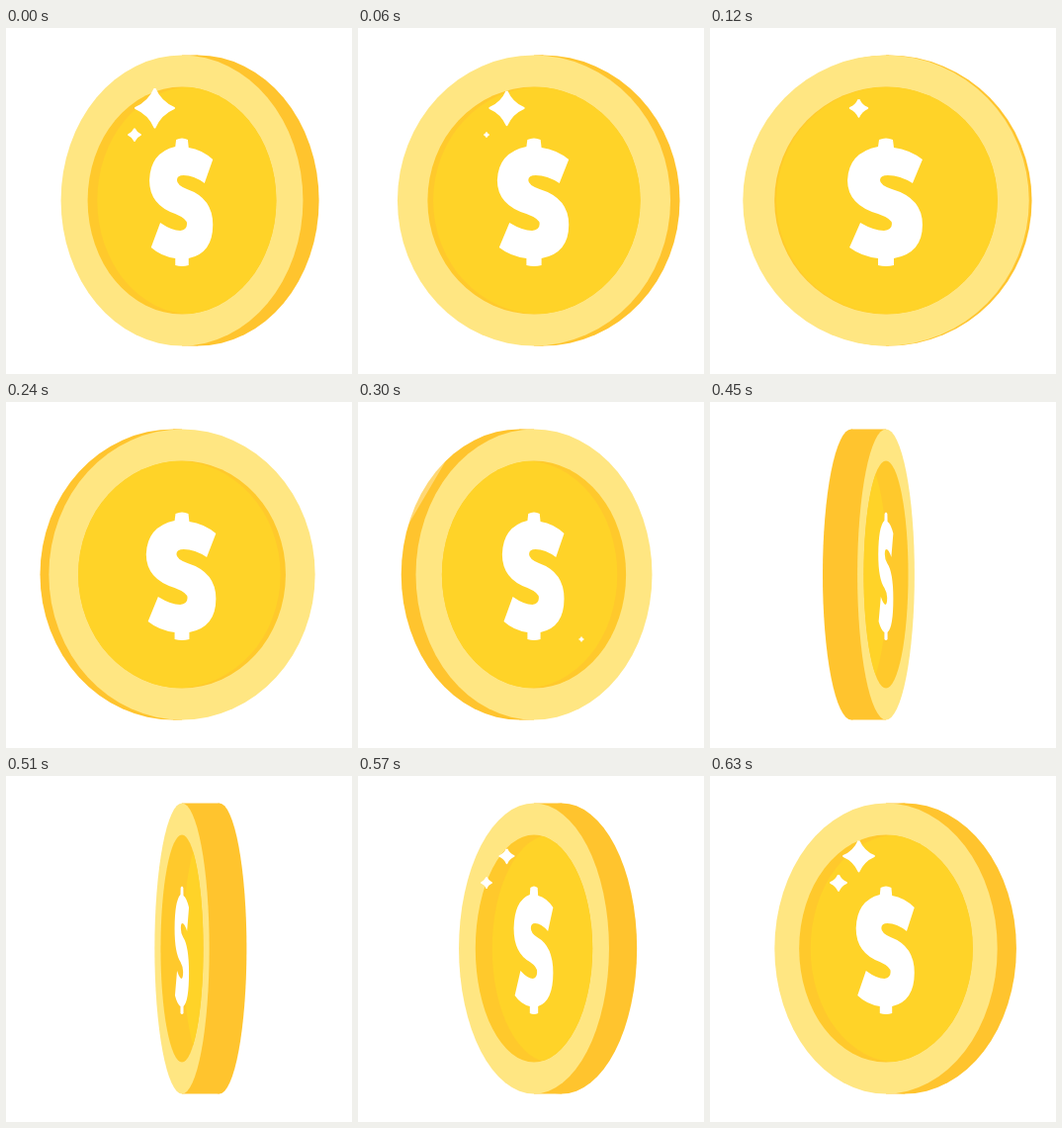
An HTML page with a canvas that plays this animation: 350 by 350 pixels, repeating every 660 ms.

```html
<!DOCTYPE html>
<html lang="en">
<head>
<meta charset="utf-8">
<title>Spinning coin</title>
<style>
  html, body { margin: 0; width: 100%; height: 100%; overflow: hidden; background: #fff; }
  canvas { display: block; width: 350px; height: 350px; }
</style>
</head>
<body>
<canvas id="stage" width="350" height="350"></canvas>
<script>
const ctx = document.getElementById('stage').getContext('2d');
const LOOP = 660, STEP = 30;
const CX = 178, CY = 174.5, RY = 147, RX = 145;
const RIM = '#ffe682', FACE = '#ffd328', SHADE = '#ffc92c', EDGE = '#ffc42e';

const dollar = new Path2D(
  'M-7 113Q0 110 7 113L8 121Q24 123 37 133L27 157Q14 149 2 149Q-6 149-6 154' +
  'Q-6 159 6 163Q37 172 37 199Q37 228 8 233L8 240Q0 242-8 240L-8 233' +
  'Q-25 231-37 222L-26 197Q-12 205-2 205Q6 204 6 198Q6 193-8 188' +
  'Q-39 179-39 154Q-38 126-8 120Z');

// Turn of the coin in degrees at given times; it gains half a turn per loop.
const turn = [[0, 32.4], [120, 3.5], [240, -21.8], [300, -34.5], [390, -57], [510, -101], [630, -141]];
const knot = i => {
  const n = turn.length, lap = Math.floor(i / n), [t, a] = turn[i - lap * n];
  return [t + lap * LOOP, a - lap * 180];
};
const slope = i => {
  const [t0, a0] = knot(i - 1), [t1, a1] = knot(i + 1);
  return (a1 - a0) / (t1 - t0);
};

function angleAt(t) {
  let i = turn.length - 1;
  while (turn[i][0] > t) i--;
  const [t0, a0] = knot(i), [t1, a1] = knot(i + 1);
  const d = t1 - t0, u = (t - t0) / d, v = 1 - u;
  const a = v * v * (1 + 2 * u) * a0 + u * u * (1 + 2 * v) * a1
          + d * u * v * (v * slope(i) - u * slope(i + 1));
  return (a < -90 ? a + 180 : a) * Math.PI / 180;
}

function oval(x, rx, ry, color) {
  ctx.fillStyle = color;
  ctx.beginPath();
  ctx.ellipse(x, CY, rx, ry, 0, 0, 7);
  ctx.fill();
}

function drawCoin(angle) {
  const w = Math.cos(angle), depth = 26.5 * angle + 1.2;
  oval(CX + depth, RX * w, RY, EDGE);
  ctx.fillRect(CX + Math.min(0, depth), CY - RY, Math.abs(depth), 2 * RY);
  oval(CX, RX * w, RY, RIM);
  oval(CX, 113 * w, 115, SHADE);
  ctx.save();
  ctx.clip();
  oval(CX + depth * 0.6, 113 * w, 115, FACE);
  ctx.restore();
  ctx.save();
  ctx.translate(CX, 0);
  ctx.scale(w, 1);
  ctx.fillStyle = '#fff';
  ctx.fill(dollar);
  ctx.restore();
}

// Slanted band of light sweeping to the right.
function drawShine(t) {
  const x = 177.5 + (t - 390) * 2.1, half = 29.5, lean = 180 / 1.7;
  ctx.fillStyle = 'rgba(255,255,255,.34)';
  ctx.beginPath();
  ctx.moveTo(x - half + lean, 0);
  ctx.lineTo(x + half + lean, 0);
  ctx.lineTo(x + half - lean, 360);
  ctx.lineTo(x - half - lean, 360);
  ctx.fill();
}

// Four-pointed star that grows until its peak time and shrinks again.
function drawStar(t, x, y, peak, size, rise, fall) {
  const dt = (t - peak + LOOP * 1.5) % LOOP - LOOP / 2;
  const r = size * (1 - (dt < 0 ? -dt / rise : dt / fall));
  if (r <= 0) return;
  const k = r * 0.3;
  ctx.fillStyle = '#fff';
  ctx.beginPath();
  ctx.moveTo(x, y - r);
  ctx.quadraticCurveTo(x + k, y - k, x + r, y);
  ctx.quadraticCurveTo(x + k, y + k, x, y + r);
  ctx.quadraticCurveTo(x - k, y + k, x - r, y);
  ctx.quadraticCurveTo(x - k, y - k, x, y - r);
  ctx.fill();
  ctx.strokeStyle = '#fff';
  ctx.lineWidth = Math.min(2, r / 4);
  ctx.lineJoin = 'round';
  ctx.stroke();
}

function frame(now) {
  const t = Math.floor(now % LOOP / STEP) * STEP;
  ctx.fillStyle = '#fff';
  ctx.fillRect(0, 0, 350, 350);
  drawCoin(angleAt(t));
  drawShine(t);
  drawStar(t, 150.5, 81, 22, 22.5, 165, 160);
  drawStar(t, 130, 108, 610, 9, 100, 160);
  drawStar(t, 226, 240, 430, 12, 165, 75);
  requestAnimationFrame(frame);
}
const start = performance.now();
requestAnimationFrame(now => frame(Math.max(0, now - start)));
</script>
</body>
</html>
```
